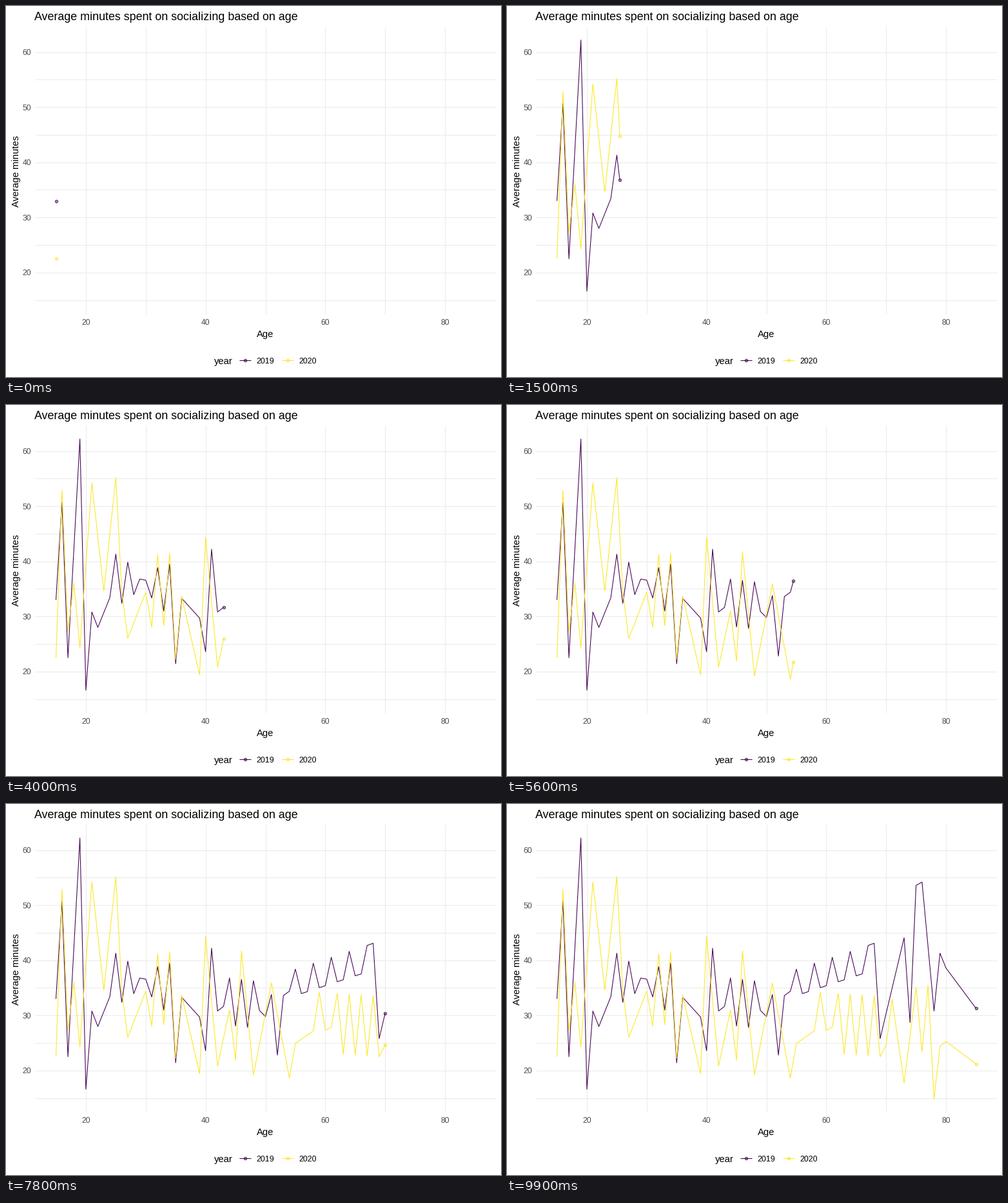
A matplotlib script for the animation above (10 s loop, 768 by 576 pixels).

```python
import matplotlib.pyplot as plt
import numpy as np
from matplotlib.animation import FuncAnimation
from matplotlib.colors import to_rgba

W, H, DPI = 768, 576, 96
PX = 72 / DPI  # points per pixel
FRAMES = 100
COLORS = {"2019": "#440154", "2020": "#FDE725"}

ages = np.append(np.arange(15, 81), 85)
# Every age is reached on a whole frame; the tip moves linearly in between.
keys = np.round((ages - 15) / 70 * (FRAMES - 1))


def series(turns, waves):
    """Straight legs between turning points, plus (start, end, period, swing) waves."""
    values = np.interp(ages, *zip(*turns))
    for start, end, period, swing in waves:
        inside = (ages >= start) & (ages <= end)
        values += inside * swing * np.cos(2 * np.pi * (ages - start) / period)
    return values


minutes = {
    "2019": series(
        [(15, 33), (16, 50.7), (17, 22.5), (19, 62.2), (20, 16.6), (21, 30.8),
         (22, 28), (24, 33.4), (25, 36.8), (34, 35), (35, 21.4), (36, 33.3),
         (39, 29.7), (40, 23.6), (41, 42.2), (42, 30.8), (44, 32.5), (48, 32),
         (50, 29.8), (51, 33.8), (52, 22.8), (53, 33.6), (55, 35.2), (67, 39.5),
         (68, 43.1), (69, 25.8), (73, 44.1), (74, 28.7), (75, 53.6), (76, 54.2),
         (78, 30.8), (79, 41.3), (80, 38.6), (85, 31.3)],
        [(25, 34, 2.25, 4.5), (44, 48, 2, 4.3), (55, 67, 3, 3.2)]),
    "2020": series(
        [(15, 22.5), (16, 52.9), (17, 27.3), (18, 36), (19, 24.3), (21, 54.2),
         (23, 34.6), (25, 55.2), (26, 34.4), (27, 26), (30, 34.4), (34, 35),
         (35, 28.7), (36, 33.7), (39, 19.4), (40, 44.4), (42, 20.8), (44, 31),
         (45, 21.9), (46, 41.7), (48, 19.2), (51, 35.9), (54, 18.6), (55, 24.9),
         (58, 27.2), (59, 34.2), (60, 27.3), (62, 28.5), (69, 28), (70, 24.6),
         (71, 32.9), (73, 17.7), (75, 35.1), (76, 23.4), (77, 35.5), (78, 14.8),
         (79, 24.4), (80, 25.3), (85, 21.2)],
        [(31, 35, 2, -6.5), (62, 69, 2, 5.5)]),
}


def px_x(age):
    return 45 + (age - 11.5) * 9.286


def px_y(value):
    return 413.8 - (value - 20) * 8.555


plt.rcParams["font.family"] = "Liberation Sans"
fig = plt.figure(figsize=(W / DPI, H / DPI), dpi=DPI, facecolor="white")
ax = fig.add_axes([0, 0, 1, 1])
ax.set(xlim=(0, W), ylim=(H, 0))
ax.axis("off")


def label(x, y, text, size, color="black", ha="left", **kw):
    ax.text(x, y, text, fontsize=size * PX, color=color, ha=ha,
            va="baseline", **kw)


def line(x, y, color, z):
    return ax.plot(x, y, color=color, lw=1.07 * PX, solid_capstyle="butt",
                   solid_joinstyle="round", zorder=z)[0]


def dot(x, y, color, z):
    return ax.plot([x], [y], "o", ms=4.4 * PX, mew=PX, zorder=z,
                   mfc=to_rgba(color, 0.5), mec=to_rgba(color, 0.7))[0]


def draw_grid():
    for v in range(15, 61, 5):
        line([45, 760], [px_y(v)] * 2, "#EBEBEB", 1)
    for a in range(20, 81, 10):
        line([px_x(a)] * 2, [32, 478], "#EBEBEB", 1)
    for v in range(20, 61, 10):
        label(39.5, px_y(v) + 4.7, str(v), 12.3, "#4D4D4D", "right")
    for a in range(20, 81, 20):
        label(px_x(a), 495, str(a), 12.3, "#4D4D4D", "center")


def draw_labels():
    label(44.5, 22, "Average minutes spent on socializing based on age", 17.9)
    label(402.5, 514, "Age", 14.8, ha="center")
    label(20, 256, "Average minutes", 14.8, ha="center",
          rotation=90, rotation_mode="anchor")
    label(323, 556, "year", 14.8)
    for x, (year, color) in zip((370.5, 436.5), COLORS.items()):
        line([x - 9, x + 9], [549.5] * 2, color, 2)
        dot(x, 549.5, color, 3)
        label(x + 18, 555, year, 12.4)


draw_grid()
draw_labels()
lines = {y: line([], [], c, 4) for y, c in COLORS.items()}
dots = {y: dot(0, 0, c, 5) for y, c in COLORS.items()}


def update(i):
    seen = keys <= i
    tip_x = px_x(np.interp(i, keys, ages))
    for year, vals in minutes.items():
        tip_y = px_y(np.interp(i, keys, vals))
        lines[year].set_data(np.append(px_x(ages[seen]), tip_x),
                             np.append(px_y(vals[seen]), tip_y))
        dots[year].set_data([tip_x], [tip_y])
    return [*lines.values(), *dots.values()]


anim = FuncAnimation(fig, update, frames=FRAMES, interval=100,
                     init_func=lambda: update(0), repeat=True, repeat_delay=0)
plt.show()
```
